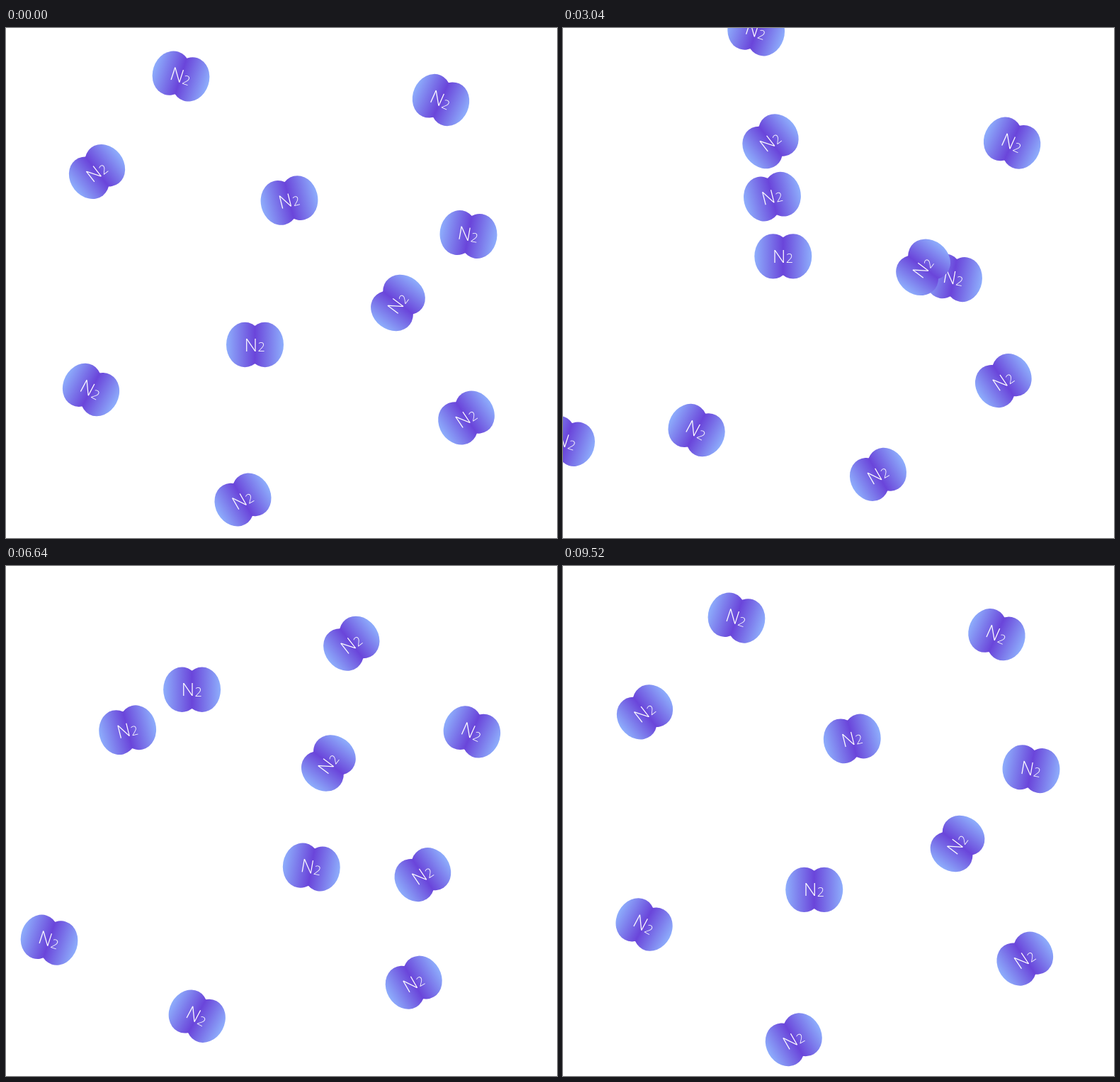
These frames come from a looping animation (778 px wide and 719 px high, 9.6 s). An HTML page:

```html
<!DOCTYPE html>
<html lang="en">
<head>
<meta charset="utf-8">
<title>Drifting nitrogen molecules</title>
<style>
  html, body { margin: 0; width: 100%; height: 100%; overflow: hidden; background: #fff; }
  svg { display: block; width: 778px; height: 719px; }
  text { font-family: "Open Sans", "Noto Sans", sans-serif; font-weight: 300; fill: #fff; }
</style>
</head>
<body>
<svg id="stage" viewBox="0 0 778 719">
  <defs>
    <linearGradient id="shade" gradientUnits="userSpaceOnUse" x1="-40.5" x2="40.5">
      <stop offset="0" stop-color="#8eaefc"/>
      <stop offset=".5" stop-color="#6a45da"/>
      <stop offset="1" stop-color="#8eaefc"/>
    </linearGradient>
    <g id="molecule">
      <g fill="url(#shade)">
        <ellipse cx="-14.2" rx="26.3" ry="31.7"/>
        <ellipse cx="14.2" rx="26.3" ry="31.7"/>
      </g>
      <text x="-15" y="9" font-size="26">N</text>
      <text x="4" y="9.5" font-size="18">2</text>
    </g>
  </defs>
</svg>
<script>
const LOOP = 9600, STEP = 80;
const HOLD = 8880;    // the drift stops here
const JUMP = 9040;    // and restarts here, a little before its starting pose
const RUN_UP = -720;
const SPAN = 9000;    // ms a molecule takes between its two key points

const stage = document.getElementById("stage");
const movers = [];

// Adds a molecule that glides in a straight line; later ones lie on top.
function drift([x0, y0], [x1, y1], tilt) {
  const node = document.createElementNS("http://www.w3.org/2000/svg", "use");
  node.setAttribute("href", "#molecule");
  stage.append(node);
  movers.push(p => node.setAttribute("transform",
    `translate(${x0 + (x1 - x0) * p} ${y0 + (y1 - y0) * p}) rotate(${tilt})`));
}

drift([247, 68], [323, -122], 18);
drift([-43, 629], [98, 491], 18);
drift([614, 101.5], [673.5, 281], 24);
drift([128.5, 202.5], [615.5, 76], -38);
drift([653, 291], [352.5, 472], 10);
drift([553.5, 387.5], [420.5, 239], -53);
drift([351.5, 446.5], [231, 77.5], 0);
drift([400, 243], [90.5, 227], -14);
drift([120, 510], [323, 679], 28);
drift([650, 549.5], [566.5, 394.5], -34);
drift([334.5, 665], [661.5, 559.5], -30);

function progress(ms) {
  const t = Math.floor((ms % LOOP) / STEP) * STEP;
  return (t < JUMP ? Math.min(t, HOLD) : t - JUMP + RUN_UP) / SPAN;
}

const start = performance.now();
function tick() {
  const p = progress(performance.now() - start);
  movers.forEach(move => move(p));
  requestAnimationFrame(tick);
}
tick();
</script>
</body>
</html>
```
